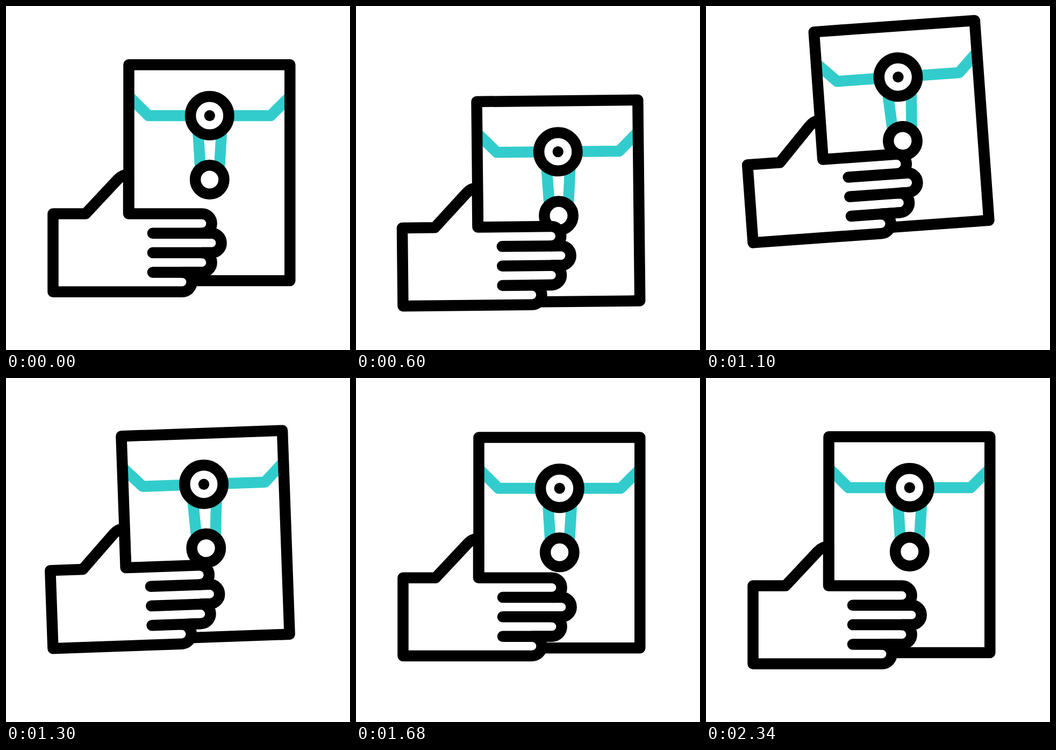
An HTML page for the animation above (2400 ms loop, 640 by 640 pixels).

```html
<!DOCTYPE html>
<html lang="en">
<head>
<meta charset="utf-8">
<title>Hand with envelope</title>
<style>
  html, body { margin: 0; width: 100%; height: 100%; overflow: hidden; background: #fff; }
  svg { display: block; width: 100vw; height: 100vh; }
  path, .ring { stroke-width: 20.5; stroke-linejoin: round; stroke-linecap: round; }
  .ink { fill: #fff; stroke: #000; }
  .line { fill: none; stroke: #000; }
  .cord { fill: none; stroke: #3cc; }
</style>
</head>
<body>
<svg viewBox="0 0 640 640">
  <g id="all">
    <path id="flap" class="cord" d="M230 169L265 204H492.5L527 169.5M357.3 232L361.5 302M401.2 232L397 302"/>
    <path id="frame" class="line"/>
    <g id="buttons">
      <circle class="ink ring" cx="378.8" cy="204" r="35.7"/>
      <circle cx="378.8" cy="204" r="10.2"/>
      <circle class="ink ring" cx="378.8" cy="323" r="26.7"/>
    </g>
    <path id="hand" class="ink"/>
    <path id="gaps" class="line"/>
  </g>
</svg>
<script>
const LOOP = 2400, STEP = 20;
const LEFT = 87.5, KNUCKLES = 386.5, FINGER = 36.3;
const FLOOR = KNUCKLES + 4 * FINGER;
const TIPS = [364.5, 382.5, 364.5, 327.5];

// Turning points as [ms, value]; the motion eases from one to the next.
const lift = [[0, 0], [340, -83], [686, 45], [1110, -91.5], [1467, 23], [1900, -54.5], [2300, 0]];
const tilt = [[0, 0], [400, -5.15], [740, 2], [1100, -4.1], [1500, 0]];
const slide = [[0, 0], [700, 46], [2340, 0]];

function ease(keys, t) {
  const i = keys.findIndex(([ms]) => ms > t);
  if (i < 0) return keys[keys.length - 1][1];
  const [t0, a] = keys[i - 1], [t1, b] = keys[i];
  return a + (b - a) * (1 - Math.cos(Math.PI * (t - t0) / (t1 - t0))) / 2;
}

const [all, flap, frame, buttons, hand, gaps] =
  ['all', 'flap', 'frame', 'buttons', 'hand', 'gaps'].map(id => document.getElementById(id));

// Each finger is a half circle at the end of its row.
const fingers = TIPS.map(x => `H${x}a${FINGER / 2} ${FINGER / 2} 0 0 1 0 ${FINGER}`).join('');
hand.setAttribute('d',
  `M${LEFT} ${KNUCKLES}H148L207.5 323C213 317 220 313.5 228 313.3V${KNUCKLES}${fingers}H${LEFT}Z`);
gaps.setAttribute('d',
  [1, 2, 3].map(i => `M273 ${KNUCKLES + i * FINGER}H${TIPS[i - 1]}`).join(''));

function draw(t) {
  const angle = ease(tilt, t), top = ease(slide, t);
  const base = 0.37 * top + angle; // the lower edge follows less, and tucks in with the tilt
  all.setAttribute('transform',
    `translate(0 ${ease(lift, t)}) rotate(${angle} ${LEFT} ${FLOOR})`);
  for (const part of [flap, buttons]) part.setAttribute('transform', `translate(0 ${top})`);
  frame.setAttribute('d', `M228.5 ${109.2 + top}H528.3V${511 + base}H228.5Z`);
}

const start = performance.now();
function tick() {
  const t = (performance.now() - start) % LOOP;
  draw(Math.floor(t / STEP) * STEP);
  requestAnimationFrame(tick);
}
tick();
</script>
</body>
</html>
```
